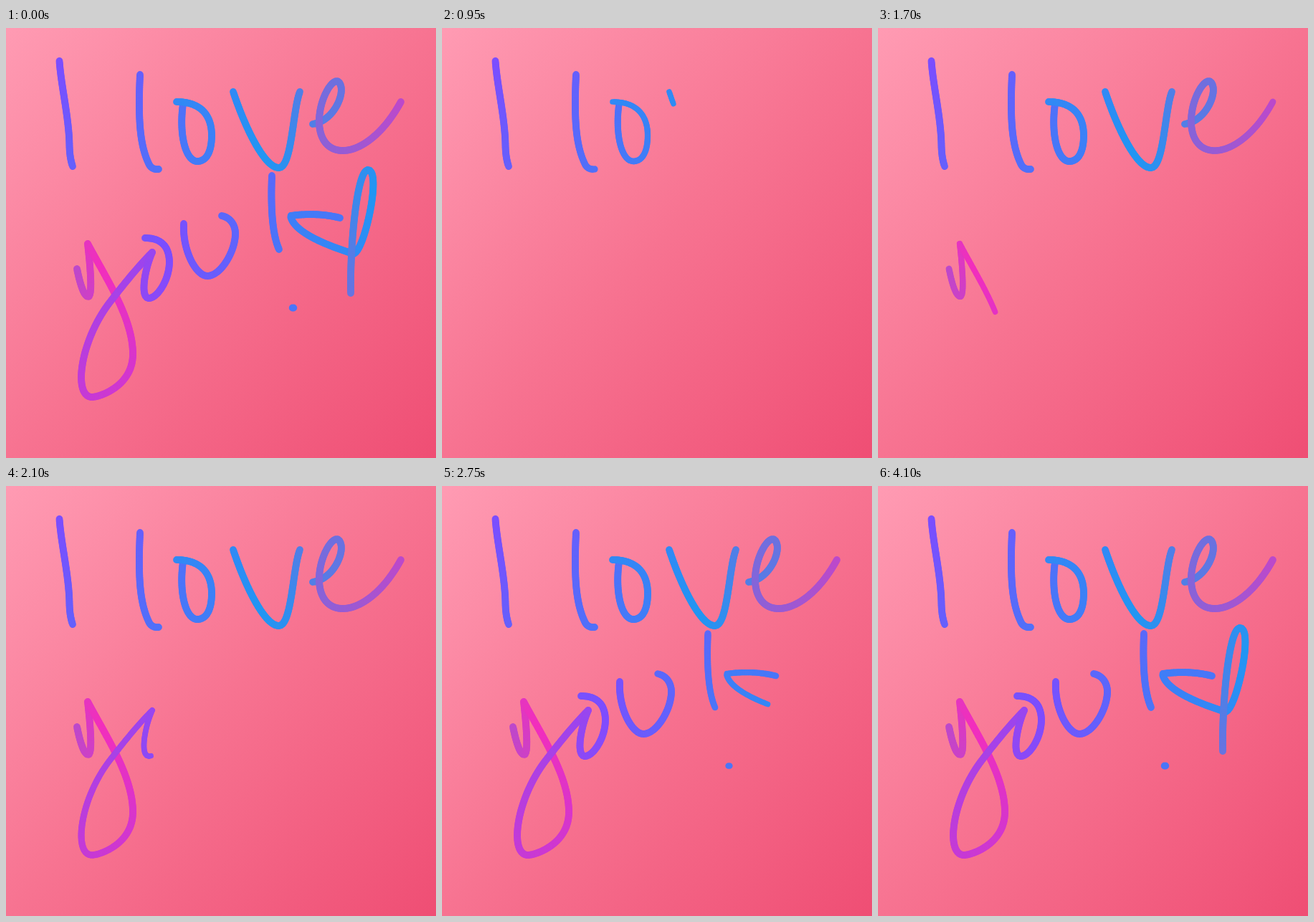
Write an HTML page with a canvas that moves like this. It is 600 px wide and 600 px high and loops after 4.2 s.

```html
<!DOCTYPE html>
<html lang="en">
<head>
<meta charset="utf-8">
<title>I love you</title>
<style>
  html, body { margin: 0; width: 100%; height: 100%; overflow: hidden; }
  body { background: linear-gradient(135deg, #ff9bb3, #f77391 50%, #ef4e74); }
  canvas { display: block; width: 600px; height: 600px; }
</style>
</head>
<body>
<canvas id="pad" width="600" height="600"></canvas>
<script>
const LOOP = 4200, TICK = 50, STEP = 3;
const ctx = document.getElementById('pad').getContext('2d');
ctx.lineCap = 'round';

// Pen strokes in writing order
const strokes = [
  'M74.5 46C77 82 88 125 88.5 165Q89 182 93 193', // I
  'M187 65C184 130 187 165 200 191Q204 198 213 197', // l
  'M247 106C241 150 251 186 267 186C280 186 287 172 287 150C287 120 270 103 238 103', // o
  'M317 89C335 143 362 196 381 195C399 194 400 115 410 89', // v
  'M428 134C456 130 472 95 467 80C461 60 437 95 437 130C437 190 505 187 551 103', // e
  'M99 336Q107 375 115 375Q122 372 114 301', // y
  'M114 301C140 350 177 405 177 455C177 500 130 515 120 515C93 515 103 435 147 380Q180 337 204 313',
  'M204 313C194 335 186 378 200 377C215 376 237 335 224 308Q216 293 194 293', // o
  'M248 273C246 310 265 346 281 346C300 346 321 310 320 285C319 272 311 264 301 262', // u
  'M371 206Q368 280 381 309', // !
  'M399.7 390.5h1.6',
  'M466 265Q435 257 397 262C400 280 430 298 485 315C500 312 525 198 505 198C490 198 480 300 481 370' // heart
];

// When the pen reaches a point: [stroke number + part of it, ms]
const pace = [[0, 350], [1.2, 550], [4.25, 1300], [7.39, 2100], [11.305, 2750], [strokes.length, 3200]];

// Ink fades through these colours, one after another
const inks = [[124, 77, 255], [33, 150, 243], [242, 46, 188]];
const INK_RUN = 610;

function ink(s) {
  const k = Math.floor(s / INK_RUN), u = s / INK_RUN - k;
  const a = inks[k % 3], b = inks[(k + 1) % 3];
  return `rgb(${a.map((v, i) => Math.round(v + (b[i] - v) * u))})`;
}

const segs = [], starts = [];
let total = 0;
for (const d of strokes) {
  const path = document.createElementNS('http://www.w3.org/2000/svg', 'path');
  path.setAttribute('d', d);
  const len = path.getTotalLength(), parts = Math.ceil(len / STEP);
  let from = path.getPointAtLength(0);
  starts.push(total);
  for (let j = 1; j <= parts; j++) {
    const to = path.getPointAtLength(len * j / parts);
    segs.push({ from, to, s: total + len * j / parts });
    from = to;
  }
  total += len;
}
starts.push(total);

// Pen travels evenly between the paced points
const timing = pace.map(([p, ms]) => {
  const i = Math.min(Math.floor(p), strokes.length - 1);
  return [starts[i] + (starts[i + 1] - starts[i]) * (p - i), ms];
});
function penTime(s) {
  const i = Math.max(1, timing.findIndex(row => row[0] >= s - 0.01));
  const [s0, t0] = timing[i - 1], [s1, t1] = timing[i];
  return t0 + (t1 - t0) * (s - s0) / (s1 - s0);
}

for (const g of segs) {
  g.ink = ink(g.s);
  g.born = penTime(g.s);
}

// Fresh ink is thin and swells to full weight
const weight = age => 7.5 + 2.3 * Math.min(1, age / 350);

function draw(now) {
  ctx.clearRect(0, 0, 600, 600);
  const time = now < TICK ? LOOP : now;
  for (const { from, to, ink, born } of segs) {
    if (born > time + 0.1) break;
    ctx.strokeStyle = ink;
    ctx.lineWidth = weight(time - born);
    ctx.beginPath();
    ctx.moveTo(from.x, from.y);
    ctx.lineTo(to.x, to.y);
    ctx.stroke();
  }
}

const start = performance.now();
let last = -1;
function frame() {
  const t = (performance.now() - start) % LOOP;
  const step = Math.floor(t / TICK) * TICK;
  if (step !== last) draw(last = step);
  requestAnimationFrame(frame);
}
frame();
</script>
</body>
</html>
```
